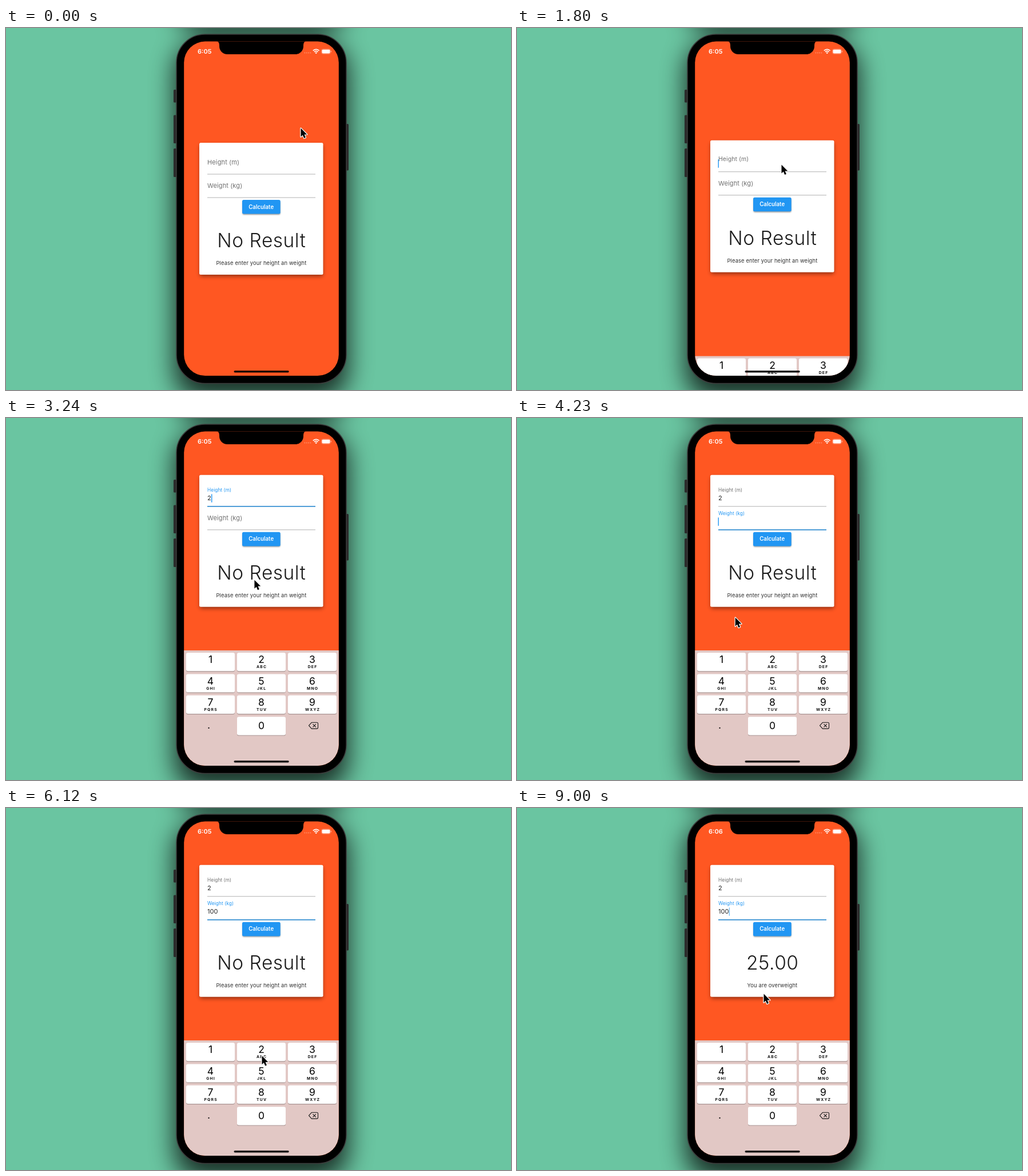
An HTML page for the animation above (9090 ms loop, 883 px wide and 634 px high).

```html
<!DOCTYPE html>
<html lang="en">
<head>
<meta charset="utf-8">
<title>BMI calculator</title>
<style>
  html, body { margin: 0; width: 100%; height: 100%; overflow: hidden; background: #6ac5a1; }
  svg { display: block; width: 100vw; height: 100vh; }
  text { font-family: Inter, Roboto, "Open Sans", sans-serif; }
  .mid { text-anchor: middle; }
  .field { font-size: 11px; fill: #212121; }
  .digit { font-size: 17.5px; fill: #000; }
  .letters { font-size: 6.8px; font-weight: 700; letter-spacing: 1.2px; fill: #111; }
</style>
</head>
<body>
<svg viewBox="0 0 883 634">
  <defs>
    <clipPath id="screenClip"><rect x="311.2" y="23.6" width="270.6" height="585.4" rx="37"/></clipPath>
    <filter id="blurWide" x="-60%" y="-30%" width="220%" height="160%"><feGaussianBlur stdDeviation="22"/></filter>
    <filter id="blurCard" x="-20%" y="-20%" width="140%" height="140%"><feGaussianBlur stdDeviation="3.5"/></filter>
    <filter id="blurSmall" x="-20%" y="-40%" width="140%" height="180%"><feGaussianBlur stdDeviation="1"/></filter>
  </defs>

  <rect width="883" height="634" fill="#6ac5a1"/>
  <g opacity=".74" filter="url(#blurWide)">
    <rect x="294" y="-400" width="305" height="404" rx="52"/>
    <rect x="294" y="24" width="305" height="628" rx="52"/>
  </g>

  <!-- phone body -->
  <g fill="#2b2b2b">
    <rect x="293" y="108" width="5" height="22.5" rx="1.5"/>
    <rect x="293" y="152.5" width="5" height="49.5" rx="1.5"/>
    <rect x="293" y="211" width="5" height="50" rx="1.5"/>
    <rect x="594.5" y="168" width="4.5" height="81.5" rx="1.5"/>
  </g>
  <rect x="298" y="11" width="297" height="611.5" rx="50" fill="#000" stroke="#3c3c3c" stroke-width="1.5"/>

  <g clip-path="url(#screenClip)">
    <rect x="311" y="23" width="271" height="587" fill="#ff5722"/>
    <path d="M368 23 Q373 24 373 30 V32 A14 14 0 0 0 387 46 H506 A14 14 0 0 0 520 32 V30 Q520 24 525 23Z"/>

    <g fill="#fff">
      <text id="clock" x="335" y="45" font-size="11" font-weight="600"></text>
      <g opacity=".35">
        <circle cx="522.5" cy="43.5" r=".9"/><circle cx="525.8" cy="43.5" r=".9"/>
        <circle cx="529.1" cy="43.5" r=".9"/><circle cx="532.4" cy="43.5" r=".9"/>
      </g>
      <g fill="none" stroke="#fff" stroke-width="1.7">
        <path d="M536.8 39.6 Q542.2 35 547.6 39.6"/>
        <path d="M538.9 41.9 Q542.2 39 545.5 41.9"/>
      </g>
      <path d="M540.3 43.2 Q542.2 41.6 544.1 43.2 L542.2 45.2Z"/>
      <rect x="552.5" y="37.7" width="14" height="6.8" rx="1.8"/>
      <rect x="551.6" y="36.8" width="15.8" height="8.6" rx="2.6" fill="none" stroke="#fff" stroke-width=".6" opacity=".45"/>
      <rect x="568" y="39.7" width="1" height="2.8" rx=".5" opacity=".5"/>
    </g>

    <g id="card">
      <rect x="339" y="4" width="215" height="230" rx="3" opacity=".42" filter="url(#blurCard)"/>
      <rect x="338" width="216.5" height="231" rx="2.5" fill="#fff"/>
      <g id="fields"></g>
      <rect x="413.5" y="102" width="66" height="24" rx="2.5" opacity=".4" filter="url(#blurSmall)"/>
      <rect x="413" y="100" width="66.7" height="24.6" rx="2.5" fill="#2196f3"/>
      <text class="mid" x="446.2" y="115.6" font-size="9.7" font-weight="600" fill="#fff">Calculate</text>
      <text id="result" class="mid" x="446.8" y="183.2" font-size="33.5" font-weight="350" letter-spacing=".5" fill="#1c1c1c"></text>
      <text id="note" class="mid" x="446.4" y="214.2" font-size="9.4" letter-spacing=".13" fill="#303030"></text>
    </g>

    <g id="keyboard">
      <rect x="311" width="271" height="204" fill="#e2c8c5"/>
      <g id="keys"></g>
      <text class="mid digit" x="354.5" y="136.5">.</text>
      <g fill="none" stroke="#1a1a1a" stroke-width="1.1" stroke-linejoin="round" stroke-linecap="round">
        <path d="M529.5 131.7 L534.3 126.3 H543.5 Q545.5 126.3 545.5 128.3 V135.1 Q545.5 137.1 543.5 137.1 H534.3Z"/>
        <path d="M536.8 129.3 L541.6 134.1 M541.6 129.3 L536.8 134.1"/>
      </g>
    </g>
    <rect x="398.5" y="600" width="96.3" height="3.6" rx="1.8" opacity=".88"/>
  </g>

  <g id="mouse">
    <g id="ring">
      <circle cx="-1" cy="8" r="22" opacity=".05"/>
      <circle cx="-1.5" cy="2" r="19" fill="#fff" fill-opacity=".1" stroke="#fff" stroke-opacity=".85" stroke-width="5.5"/>
      <circle cx="-1.5" cy="2" r="19" fill="none" stroke="#f7d70f" stroke-width="3.2"/>
    </g>
    <path d="M.5 .5 V15.6 L3.8 12.5 L6.2 18 L8.9 16.8 L6.6 11.4 H11.3Z" stroke="#fff" stroke-width="2.4" stroke-linejoin="round" paint-order="stroke"/>
  </g>
</svg>

<script>
const LOOP = 9090, STEP = 90;
const $ = id => document.getElementById(id);
const clamp = v => Math.min(1, Math.max(0, v));
const lerp = (a, b, u) => a + (b - a) * u;
const smooth = u => u * u * (3 - 2 * u);
const ramp = (t, from, length) => smooth(clamp((t - from) / length));
const mix = (a, b, u) => `rgb(${a.map((v, i) => Math.round(lerp(v, b[i], u)))})`;

const GREY = [112, 112, 112], LINE = [190, 190, 190], BLUE = [33, 150, 243], LINE_BLUE = [48, 140, 208];

function add(parent, tag, attrs, text = '') {
  const node = document.createElementNS('http://www.w3.org/2000/svg', tag);
  set(node, attrs);
  node.textContent = text;
  return parent.appendChild(node);
}
function set(node, attrs) {
  for (const name in attrs) node.setAttribute(name, attrs[name]);
}

// keypad
const LETTERS = ['', 'ABC', 'DEF', 'GHI', 'JKL', 'MNO', 'PQRS', 'TUV', 'WXYZ'];
const keyFaces = {};
function makeKey(digit, col, row, letters) {
  const x = 315 + col * 89, y = 4 + row * 37.4, cx = x + 42.5;
  add($('keys'), 'rect', { x, y: y + 1.2, width: 85, height: 32.2, rx: 3.2, fill: '#a99593' });
  keyFaces[digit] = add($('keys'), 'rect', { x, y, width: 85, height: 32.2, rx: 3.2 });
  add($('keys'), 'text', { class: 'mid digit', x: cx, y: y + (digit ? 18.2 : 22.2) }, digit);
  if (letters) add($('keys'), 'text', { class: 'mid letters', x: cx + .6, y: y + 27.4 }, letters);
}
LETTERS.forEach((letters, i) => makeKey(i + 1, i % 3, Math.floor(i / 3), letters));
makeKey(0, 1, 3);

// presses: start, end, digit if a key is hit
const PRESSES = [
  [1600, 1720], [2690, 2800, 2], [3600, 3740], [4550, 4680, 1],
  [5260, 5350, 0], [5370, 5440, 0], [6940, 7090]
];

// pointer stops: time, x, y
const STOPS = [
  [0, 515, 175], [300, 515, 175], [1400, 462, 239], [1800, 462, 239], [2160, 464, 236],
  [2680, 446, 428], [2850, 446, 428], [3559, 425, 176], [3850, 425, 176], [4450, 362, 425],
  [4932, 362, 425], [5240, 447, 532], [5750, 447, 532], [6750, 447, 214], [7100, 447, 214],
  [7740, 405, 335], [8820, 405, 335], [9000, 431, 325]
];
function pointerAt(t) {
  const next = STOPS.findIndex(s => s[0] > t);
  if (next < 0) return STOPS[STOPS.length - 1].slice(1);
  const a = STOPS[next - 1], b = STOPS[next];
  const u = smooth((t - a[0]) / (b[0] - a[0]));
  return [lerp(a[1], b[1], u), lerp(a[2], b[2], u)];
}

function makeField(name, dy, focus, blur, typed) {
  const g = add($('fields'), 'g', { transform: `translate(0 ${dy})` });
  return {
    focus, blur, typed,
    line: add(g, 'rect', { x: 352, width: 189 }),
    label: add(g, 'text', { x: 352, 'letter-spacing': '.012em' }, name),
    value: add(g, 'text', { class: 'field', x: 352, y: 44 }),
    caret: add(g, 'rect', { y: 33.5, width: 1.4, height: 14.5, fill: '#2196f3' })
  };
}
const fields = [
  makeField('Height (m)', 0, 1740, 3750, [[2800, '2']]),
  makeField('Weight (kg)', 41, 3750, Infinity, [[4680, '1'], [5350, '0'], [5440, '0']])
];

// solid after each key, then a soft blink once per second
function caretAlpha(since) {
  if (since < 500) return 1;
  const p = (since - 500) % 1000;
  if (p < 450) return 1 - clamp(p / 150);
  return clamp((p - 450) / 290);
}

function drawField(f, t) {
  const up = ramp(t, f.focus, 200);
  const active = ramp(t, f.focus + 60, 180) * (1 - ramp(t, f.blur, 180));
  const hits = f.typed.filter(k => k[0] <= t);
  const last = hits.length ? hits[hits.length - 1][0] : f.focus;
  const focused = t >= f.focus && t < f.blur;
  const height = lerp(1.2, 1.7, active);
  set(f.label, { y: lerp(38, 29, up), 'font-size': lerp(11, 8.25, up), fill: mix(GREY, BLUE, active) });
  set(f.line, { y: 55 - height / 2, height, fill: mix(LINE, LINE_BLUE, active) });
  f.value.textContent = hits.map(k => k[1]).join('');
  const end = hits.length ? 352.3 + f.value.getComputedTextLength() : 351.5;
  set(f.caret, { x: end, opacity: focused ? caretAlpha(t - last) : 0 });
}

// critically damped rise of the keyboard
function spring(ms) {
  const w = Math.max(0, ms) * .019;
  return 1 - (1 + w) * Math.exp(-w);
}

function draw(t) {
  $('clock').textContent = t < 6300 ? '6:05' : '6:06';
  $('card').setAttribute('transform', `translate(0 ${lerp(201, 99.8, spring(t - 1783))})`);
  $('keyboard').setAttribute('transform', `translate(0 ${lerp(609, 407, spring(t - 1761))})`);
  fields.forEach(f => drawField(f, t));

  const done = t >= 7110;
  $('result').textContent = done ? '25.00' : 'No Result';
  $('note').textContent = done ? 'You are overweight' : 'Please enter your height an weight';

  const press = PRESSES.find(p => t >= p[0] && t < p[1]);
  for (const digit in keyFaces) {
    const held = press && press[2] === Number(digit);
    keyFaces[digit].setAttribute('fill', held ? '#ead9d7' : '#fff');
  }
  $('ring').setAttribute('visibility', press ? 'visible' : 'hidden');
  $('mouse').setAttribute('transform', `translate(${pointerAt(t)})`);
}

const start = performance.now();
function tick() {
  const t = (performance.now() - start) % LOOP;
  draw(Math.floor(t / STEP) * STEP);
  requestAnimationFrame(tick);
}
tick();
</script>
</body>
</html>
```
